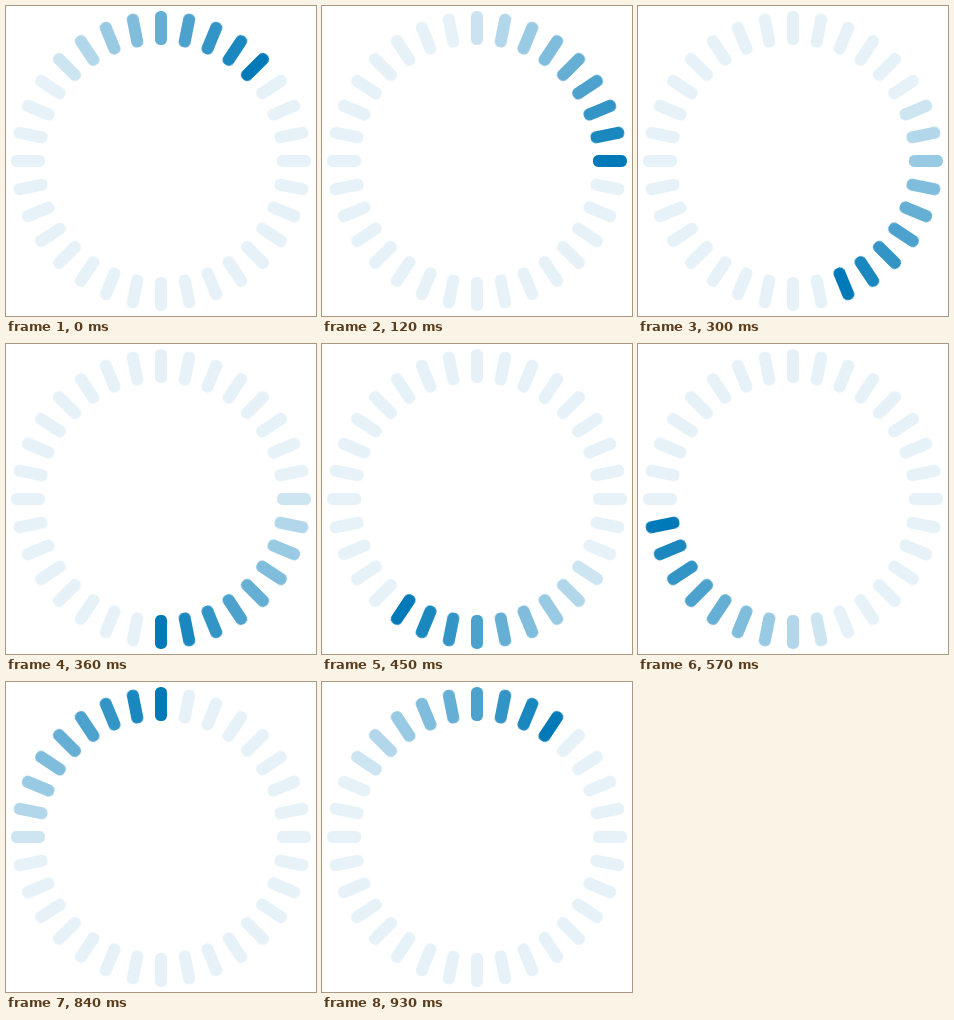
An HTML page for the animation above (960 ms loop, 310 by 310 pixels).

```html
<!DOCTYPE html>
<html lang="en">
<head>
<meta charset="utf-8">
<title>Spinner</title>
<style>
  html, body { margin: 0; width: 100%; height: 100%; overflow: hidden; background: #fff; }
  svg { display: block; width: 310px; height: 310px; }
  rect { fill: #0079b8; opacity: .1; animation: fade 960ms infinite; }
  /* Nine steps from full strength down to the resting tint */
  @keyframes fade {
    0% { opacity: 1; animation-timing-function: steps(9, end); }
    28.125%, 100% { opacity: .1; }
  }
</style>
</head>
<body>
<svg viewBox="0 0 310 310"><g id="ring"></g></svg>
<script>
  const COUNT = 32, STEP = 30, FIRST = 4;
  const ring = document.getElementById('ring');

  for (let i = 0; i < COUNT; i++) {
    const bar = document.createElementNS('http://www.w3.org/2000/svg', 'rect');
    const attrs = {
      x: 149, y: 5, width: 12, height: 34, rx: 5.5,
      transform: `rotate(${i * 360 / COUNT} 155 155)`
    };
    for (const name in attrs) bar.setAttribute(name, attrs[name]);
    // The small offset keeps step edges clear of rounding
    bar.style.animationDelay = `${(i - FIRST - COUNT) * STEP - 0.1}ms`;
    ring.append(bar);
  }
</script>
</body>
</html>
```
